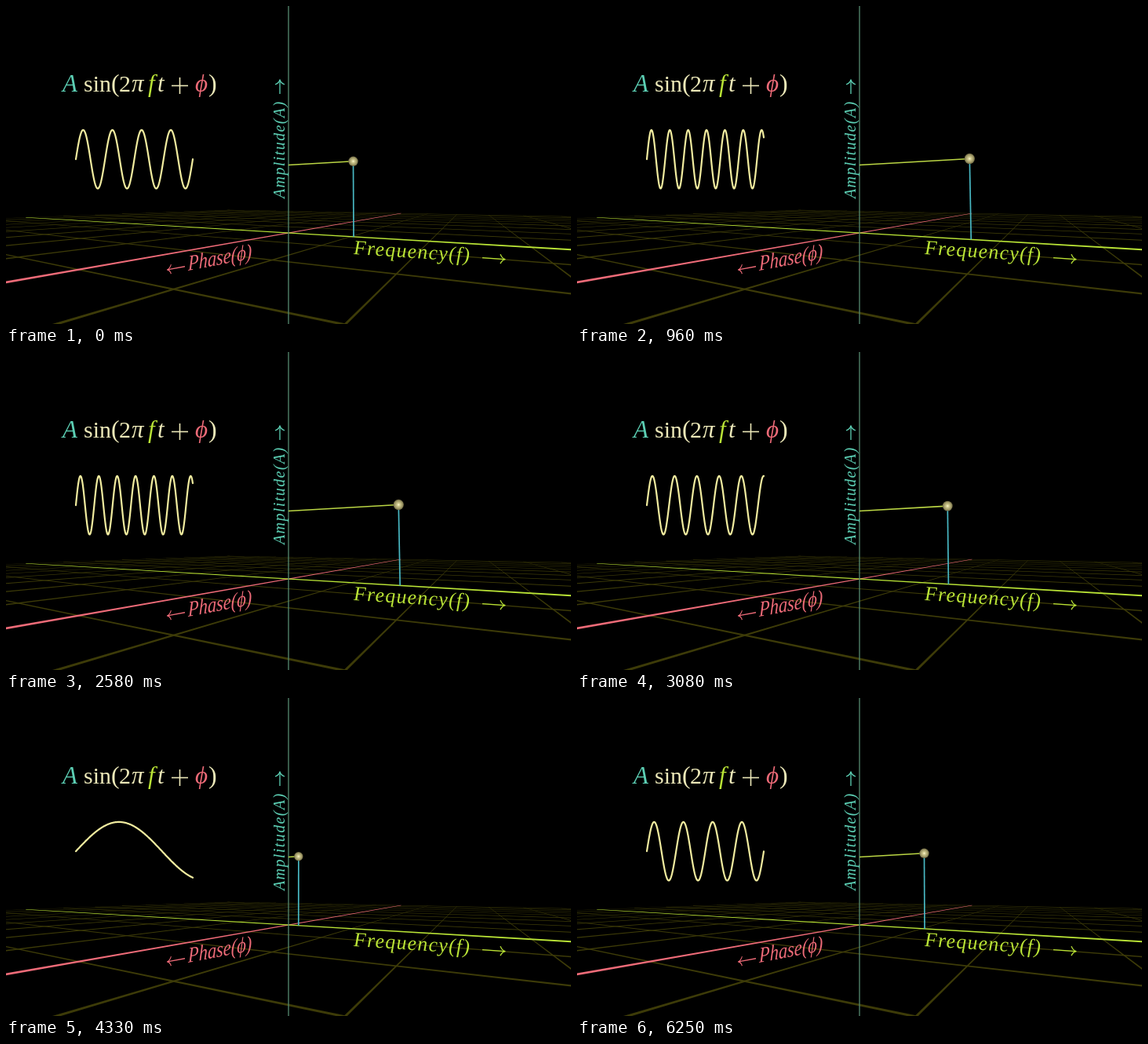
Recreate the animation shown at these times as an HTML page with a canvas. Size 720 px wide and 405 px high, loop 6290 ms.

```html
<!DOCTYPE html>
<html lang="en">
<head>
<meta charset="utf-8">
<style>
html, body { margin: 0; height: 100%; background: #000; overflow: hidden; }
canvas { display: block; width: 720px; height: 405px; }
</style>
</head>
<body>
<canvas id="stage" width="720" height="405"></canvas>
<script>
const ctx = document.getElementById('stage').getContext('2d');
const LOOP = 6290;
const FONT = '"Liberation Serif", "Times New Roman", serif';
const TEAL = '#5ccfb4', LIME = '#b9e336', PINK = '#ee6b78', CREAM = '#ece8b8';

// Frequency moves: start time, duration, from, to
const MOVES = [
  [0, 1150, 4, 6.45],
  [2290, 2420, 6.45, 0.5],
  [5040, 1250, 0.5, 4]
];
const smooth = u => u * u * u * (10 - 15 * u + 6 * u * u);

function frequencyAt(t) {
  const [start, span, from, to] = MOVES.filter(m => m[0] <= t).pop();
  return from + (to - from) * smooth(Math.min(1, (t - start) / span));
}

// Perspective of the floor: f runs to the right, p towards the viewer
const depth = (f, p) => 1 - 0.0268 * f - 0.0464 * p;
function floor(f, p) {
  const w = depth(f, p);
  return {
    x: 360 + (18.53 * f - 10.75 * p) / w,
    y: 289 + (1.093 * f + 1.877 * p) / w,
    w
  };
}

function line(x1, y1, x2, y2, color, width) {
  ctx.strokeStyle = color;
  ctx.lineWidth = width;
  ctx.beginPath();
  ctx.moveTo(x1, y1);
  ctx.lineTo(x2, y2);
  ctx.stroke();
}

// Floor line, tapered by depth and cut before it passes the camera
function floorLine(a, b, color, size) {
  const wa = depth(...a), wb = depth(...b), near = 0.12;
  if (wa < near) return;
  const k = wb < near ? (wa - near) / (wa - wb) : 1;
  const s = floor(...a);
  const e = floor(a[0] + (b[0] - a[0]) * k, a[1] + (b[1] - a[1]) * k);
  const len = Math.hypot(e.x - s.x, e.y - s.y);
  const nx = (s.y - e.y) / len, ny = (e.x - s.x) / len;
  const hs = size / s.w / 2, he = size / e.w / 2;
  ctx.fillStyle = color;
  ctx.beginPath();
  ctx.moveTo(s.x + nx * hs, s.y + ny * hs);
  ctx.lineTo(e.x + nx * he, e.y + ny * he);
  ctx.lineTo(e.x - nx * he, e.y - ny * he);
  ctx.lineTo(s.x - nx * hs, s.y - ny * hs);
  ctx.fill();
}

function text(str, x, y, size, color, style = 'italic', spacing = 0) {
  ctx.font = `${style} ${size}px ${FONT}`;
  ctx.letterSpacing = spacing + 'px';
  ctx.fillStyle = color;
  ctx.fillText(str, x, y);
}

function arrow(from, to, y, color) {
  const d = Math.sign(to - from);
  line(from, y, to, y, color, 1.3);
  ctx.beginPath();
  ctx.moveTo(to - 6 * d, y - 6);
  ctx.quadraticCurveTo(to - 4 * d, y - 1, to, y);
  ctx.quadraticCurveTo(to - 4 * d, y + 1, to - 6 * d, y + 6);
  ctx.stroke();
}

function placed(matrix, draw) {
  ctx.save();
  ctx.transform(...matrix);
  draw();
  ctx.restore();
}

function drawSpace() {
  const END = 35, STEP = 3.85;
  for (let i = -9; i <= 9; i++) {
    if (!i) continue;
    floorLine([i * STEP, -END], [i * STEP, END], '#3d3b08', 0.8);
    floorLine([-END, i * STEP], [END, i * STEP], '#3d3b08', 0.8);
  }
  floorLine([0, -END], [0, END], PINK, 1.1);
  floorLine([-END, 0], [END, 0], LIME, 1.3);
  line(360, 0, 360, 405, '#568a70', 1.3);
}

function drawLabels() {
  const y = 109;
  text('A', 72, y, 31, TEAL);
  text('sin', 99, y, 30, CREAM, 'normal');
  text('(', 134, y, 32, CREAM, 'normal');
  text('2', 144, y, 30, CREAM, 'normal');
  text('π', 160, y, 31, CREAM);
  text('f', 181, y, 31, LIME);
  text('t', 193, y, 31, CREAM);
  line(211, 101.5, 232, 101.5, CREAM, 1.6);
  line(221.5, 91, 221.5, 112, CREAM, 1.6);
  text('ϕ', 241, y, 31, PINK);
  text(')', 258, y, 32, CREAM, 'normal');

  placed([0, -1, 1, 0, 355, 245], () => {
    text('Amplitude(A)', 0, 0, 20, TEAL, 'italic', 1.4);
    arrow(133, 151, -6, TEAL);
  });
  placed([1, 0.065, 0, 1, 443, 316], () => {
    text('Frequency(f)', 0, 0, 26, LIME, 'italic', 1.2);
    arrow(164, 193, -6, LIME);
  });
  placed([0.8, -0.15, 0, 1, 232, 337], () => {
    text('Phase(ϕ)', 0, 0, 28, PINK);
    arrow(-5, -33, -6, PINK);
  });
}

function drawWave(freq) {
  ctx.strokeStyle = '#f1ec9f';
  ctx.lineWidth = 2.2;
  ctx.lineCap = ctx.lineJoin = 'round';
  ctx.beginPath();
  for (let i = 0; i <= 298; i++) {
    ctx.lineTo(89 + i / 2, 195.2 - 37.3 * Math.sin(2 * Math.PI * freq * i / 298));
  }
  ctx.stroke();
  ctx.lineCap = 'butt';
}

function drawBall(freq) {
  const w = 1 - 0.0245 * freq;
  const x = 360 + 18.6 * freq / w;
  const y = 202.5 - 0.057 * (x - 360);
  const r = 5.6 / w;
  const foot = floor(freq, 0);
  line(360, 202.5, x, y, '#bad544', 1.6);
  line(foot.x, foot.y, x, y, '#48b7c2', 1.7);
  const shade = ctx.createRadialGradient(x, y, 0, x, y, r);
  shade.addColorStop(0, '#fffbd0');
  shade.addColorStop(0.3, '#cfc88e');
  shade.addColorStop(0.75, '#9c9564');
  shade.addColorStop(1, '#69633f');
  ctx.fillStyle = shade;
  ctx.beginPath();
  ctx.arc(x, y, r, 0, 2 * Math.PI);
  ctx.fill();
}

function frame() {
  const freq = frequencyAt(performance.now() % LOOP);
  ctx.fillStyle = '#000';
  ctx.fillRect(0, 0, 720, 405);
  drawSpace();
  drawLabels();
  drawWave(freq);
  drawBall(freq);
  requestAnimationFrame(frame);
}
frame();
</script>
</body>
</html>
```
